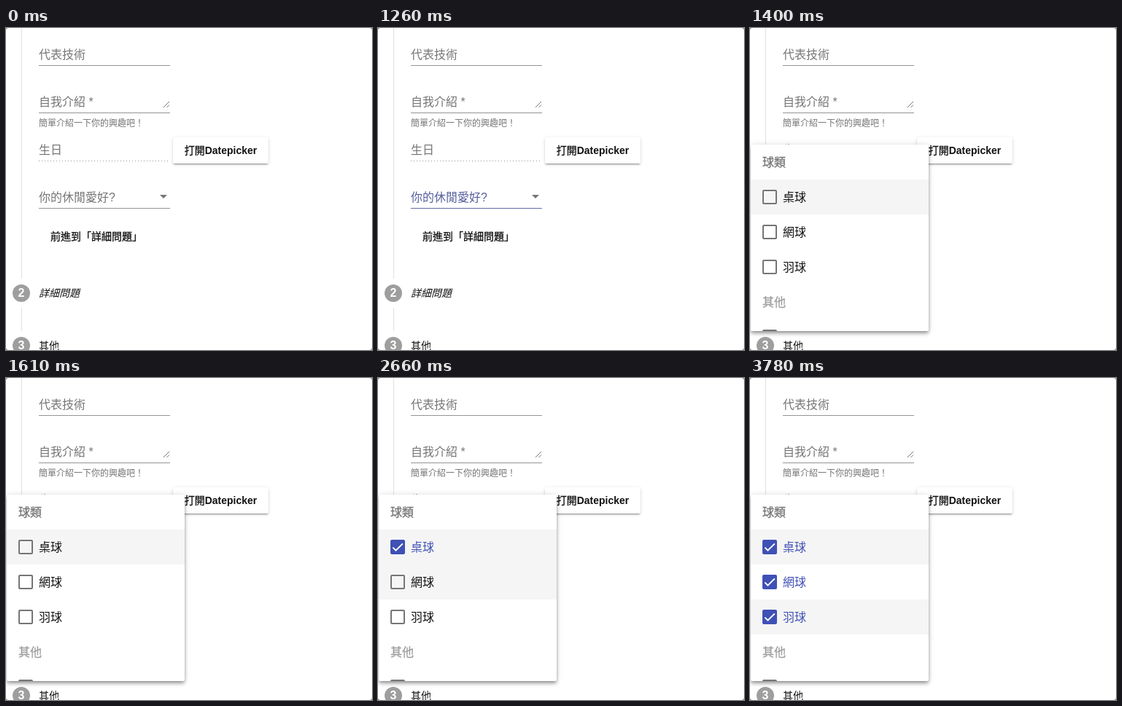
An HTML page that plays this animation: 502 px wide and 442 px high, repeating every 4.62 s.

```html
<!DOCTYPE html>
<html lang="zh-Hant">
<head>
<meta charset="utf-8">
<style>
html, body { margin: 0; width: 100%; height: 100%; overflow: hidden; background: #999; }
body { font: 16px/20px "Liberation Sans", "Noto Sans CJK TC", "Noto Sans CJK", sans-serif; }
#stage { position: absolute; left: 0; top: 0; width: 502px; height: 442px; overflow: hidden; background: #fff; border-radius: 4px; }
#stage * { position: absolute; box-sizing: border-box; white-space: nowrap; }
#stage b { position: static; -webkit-text-stroke: 0; }
.medium { font-weight: 500; -webkit-text-stroke: .3px; }
.field { left: 45px; margin-top: 1px; color: #757575; }
.hint { font-size: 12px; }
.rule { left: 45px; width: 180px; height: 1px; background: #949494; }
.dots { background: repeating-linear-gradient(90deg, #949494 0 1.33px, transparent 1.33px 4px); }
.line { left: 21px; width: 1px; background: #e0e0e0; }
.dot { left: 9px; width: 24px; height: 24px; border-radius: 50%; background: #9e9e9e; color: #fff; font-weight: bold; text-align: center; line-height: 24px; }
.step { left: 45px; font-size: 14px; color: #111; }
.next { left: 61px; font-size: 14px; color: #111; }
.button { left: 229px; top: 150px; width: 131px; height: 36px; border-radius: 2px; background: #fff; color: #111;
  font-size: 14px; line-height: 36px; text-align: center;
  box-shadow: 0 3px 1px -2px #0003, 0 2px 2px #00000024, 0 1px 5px #0000001f; }
#label { top: 222px; transform-origin: 0 50%; }
#panel { left: 1px; top: 160px; height: 256px; overflow: hidden; background: #fff; border-radius: 2px; transform-origin: 0 72px;
  box-shadow: 0 2px 4px -1px #0000004d, 0 4px 5px #00000030, 0 1px 10px #00000024; }
.row { left: 0; width: 100%; height: 48px; line-height: 50px; }
.row span { left: 44px; }
.row svg { left: 16px; top: 14px; width: 20px; height: 20px; }
.group { padding-left: 16px; color: #757575; }
</style>
</head>
<body>
<div id="stage">
  <div class="line" style="top:0;height:344px"></div>
  <div class="line" style="top:384px;height:32px"></div>

  <div class="field" style="top:26px">代表技術</div>
  <div class="rule" style="top:51px"></div>
  <div class="field" style="top:91px">自我介紹 *</div>
  <svg style="left:215px;top:100px" width="10" height="10" stroke="#777" fill="none"><path d="M1 9 9 1M5.5 9 9 5.5"/></svg>
  <div class="rule" style="top:116px"></div>
  <div class="field hint" style="top:120px">簡單介紹一下你的興趣吧！</div>
  <div class="field" style="top:157px">生日</div>
  <div class="rule dots" style="top:182px"></div>
  <div class="button medium">打開<b>Datepicker</b></div>
  <div class="field" id="label">你的休閒愛好?</div>
  <svg style="left:211px;top:229px" width="10" height="5" fill="#757575"><path d="M0 0H10L5 5Z"/></svg>
  <div class="rule" id="underline" style="top:247px"></div>
  <div class="next medium" style="top:276px">前進到「詳細問題」</div>

  <div class="dot" style="top:352px">2</div>
  <div class="step" style="top:354px;font-style:italic">詳細問題</div>
  <div class="dot" style="top:424px">3</div>
  <div class="step" style="top:426px">其他</div>

  <div id="panel"></div>
</div>
<script>
const LOOP = 4620, STEP = 70;
const $ = id => document.getElementById(id);
const clamp = v => Math.min(1, Math.max(0, v));
const rgb = c => `rgb(${c})`;
const mix = (a, b, p) => rgb(a.map((v, i) => v + (b[i] - v) * p));
const GREY = [117, 117, 117], RULE = [148, 148, 148], INDIGO = [63, 81, 181], PALE = [188, 193, 226];

// hover: [from, to], check: time of the click
const options = [
  { text: '桌球', top: 48, hover: [1400, LOOP], check: 2240 },
  { text: '網球', top: 96, hover: [2660, 3640], check: 3080 },
  { text: '羽球', top: 144, hover: [3430, LOOP], check: 3570 },
  { text: '', top: 240, hover: [LOOP, LOOP], check: LOOP }
];

const row = (top, cls, html) => {
  const el = document.createElement('div');
  el.className = 'row ' + cls;
  el.style.top = top + 'px';
  el.innerHTML = html;
  return $('panel').appendChild(el);
};

row(0, 'group medium', '球類');
row(192, 'group medium', '其他').style.color = '#9e9e9e';
for (const o of options) {
  o.el = row(o.top, '', `<svg viewBox="0 0 20 20"><rect x="1" y="1" width="18" height="18" rx="1" stroke-width="2"/>
    <path d="M3.4 10.6 7.5 14.7 16.9 5.3" fill="none" stroke="#fff" stroke-width="1.9"/></svg><span>${o.text}</span>`);
  [o.box, o.tick, o.label] = o.el.querySelectorAll('rect, path, span');
}

// cubic-bezier(.25, .8, .25, 1)
function ease(x) {
  if (x <= 0 || x >= 1) return clamp(x);
  const curve = (s, a, b) => 3 * (1 - s) ** 2 * s * a + 3 * (1 - s) * s * s * b + s ** 3;
  let lo = 0, hi = 1;
  for (let i = 0; i < 20; i++) {
    const s = (lo + hi) / 2;
    if (curve(s, .25, .25) < x) lo = s; else hi = s;
  }
  return curve(lo, .8, 1);
}

function draw(t) {
  const focus = clamp((t - 1150) / 180);
  const float = ease((t - 1290) / 400);
  $('label').style.color = mix(GREY, INDIGO, focus);
  $('underline').style.background = mix(RULE, INDIGO, focus);
  $('label').style.transform = float ? `translateY(${-20 * float}px) scale(${1 - .25 * float})` : 'none';

  const open = ease((t - 1288) / 112);
  const panel = $('panel').style;
  panel.opacity = open;
  panel.width = 180 + 64 * open + 'px';
  panel.transform = open < 1 ? `scaleY(${open})` : 'none';

  for (const o of options) {
    const on = t >= o.check, half = on && t < o.check + STEP;
    const fill = rgb(half ? PALE : INDIGO);
    o.el.style.background = t >= o.hover[0] && t < o.hover[1] ? '#f5f5f5' : 'none';
    o.label.style.color = on ? rgb(INDIGO) : '#111';
    o.box.setAttribute('fill', on ? fill : 'none');
    o.box.setAttribute('stroke', on ? fill : rgb(GREY));
    o.tick.setAttribute('opacity', on ? half ? .35 : 1 : 0);
  }
}

const start = performance.now();
function tick() {
  const t = (performance.now() - start) % LOOP;
  draw(Math.floor(t / STEP) * STEP);
  requestAnimationFrame(tick);
}
tick();
</script>
</body>
</html>
```
